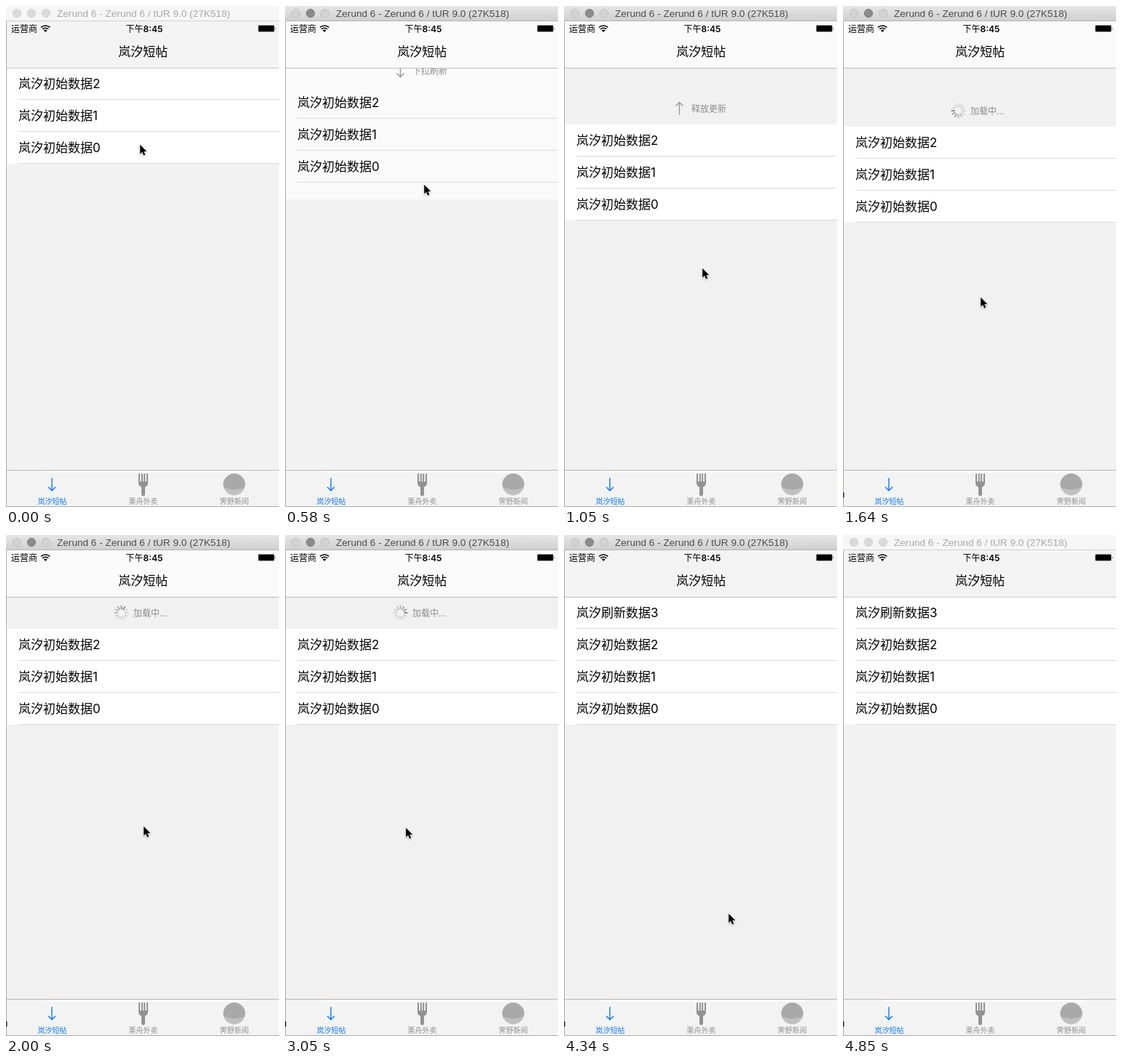
An HTML page for the animation above (4.89 s loop, 375 by 689 pixels).

```html
<!DOCTYPE html>
<html lang="zh-CN">
<head>
<meta charset="utf-8">
<style>
html, body { margin: 0; width: 100%; height: 100%; overflow: hidden; background: #f2f2f2; }
svg { display: block; width: 375px; height: 689px; }
text { font-family: Inter, "Noto Sans CJK SC", "Noto Sans CJK", sans-serif; }
#caption { font-family: "Liberation Sans", sans-serif; font-size: 13.6px; }
.mid { text-anchor: middle; }
.row { font-size: 17px; }
.tab { font-size: 10px; fill: #929292; text-anchor: middle; }
.line { fill: none; stroke-width: 1.4; }
</style>
</head>
<body>
<svg viewBox="0 0 375 689">
  <defs>
    <linearGradient id="chrome" x2="0" y2="1">
      <stop stop-color="#e6e6e6"/><stop offset="1" stop-color="#d0d0d0"/>
    </linearGradient>
    <clipPath id="page"><rect y="86" width="375" height="552"/></clipPath>
    <path id="arrow" d="M0-9V8.5M-5 3.5L0 8.5L5 3.5"/>
  </defs>

  <rect id="back" width="375" height="689"/>
  <g clip-path="url(#page)">
    <g id="header">
      <use id="pull" href="#arrow" class="line" stroke="#999"/>
      <g id="spinner"></g>
      <text id="hint" x="175" y="67.5" font-size="12" fill="#8c8c8c"></text>
    </g>
    <rect id="band" y="86" width="375" fill="#fafafa"/>
    <use id="pullOver" href="#arrow" class="line" stroke="#999"/>
    <text id="hintOver" x="175" font-size="12" fill="#8c8c8c">下拉刷新</text>
    <g id="list"><rect id="sheet" y="85" width="375" fill="#fff"/></g>
  </g>

  <rect id="nav" y="21" width="375" height="64"/>
  <rect id="navLine" y="85" width="375" height="1" fill="#bcbcbc"/>
  <rect id="sheen" x="248" y="22" width="82" height="1.5" fill="#fff"/>
  <text x="7" y="35.5" font-size="12">运营商</text>
  <path d="M48 29.4Q54.2 24.6 60.4 29.4M50.2 31.8Q54.2 28.6 58.2 31.8" fill="none" stroke="#000" stroke-width="1.6"/>
  <path d="M51.9 33.4Q54.2 31.8 56.5 33.4L54.2 36Z"/>
  <text class="mid" x="190" y="35.5" font-size="12" font-weight="600"><tspan font-weight="500">下午</tspan>8:45</text>
  <rect x="346.5" y="26.5" width="22" height="9" rx="1.5" stroke="#999"/>
  <path d="M369.7 29.3q1.5 1.7 0 3.4Z"/>
  <text class="mid" x="188.3" y="69" font-size="17" font-weight="500">岚汐短帖</text>

  <rect id="bar" width="375" height="20"/>
  <rect id="barLine" y="20" width="375" height="1"/>
  <g id="dots" stroke-width=".8">
    <circle cx="15" cy="10" r="5.7"/><circle cx="35" cy="10" r="5.7"/><circle cx="55" cy="10" r="5.7"/>
  </g>
  <text id="caption" x="70" y="15">Zerund 6 - Zerund 6 / tUR 9.0 (27K518)</text>

  <rect y="638" width="375" height="51" fill="#f3f3f3"/>
  <rect y="638" width="375" height="1" fill="#bababa"/>
  <rect x="56" y="640" width="275" height="1.5" fill="#fff"/>
  <use href="#arrow" class="line" stroke="#0a7aff" x="63" y="658"/>
  <text class="tab" x="63.5" y="684.8" style="fill:#0a7aff">岚汐短帖</text>
  <path fill="#929292" d="M182 643h2v11h1.8v-11h2v11h1.4v-11h2v11h1.8v-11h2v13q0 4-4 5.5v9.5q0 3-2.5 3t-2.5-3v-9.5q-4-1.5-4-5.5Z"/>
  <text class="tab" x="188.5" y="684.8">栗舟外卖</text>
  <circle cx="313.5" cy="658" r="15" fill="#c0c0c0"/>
  <path fill="#a9a9a9" d="M299.1 662.3A15 15 0 1 1 327.9 662.3Q313.5 668 299.1 662.3Z"/>
  <text class="tab" x="313.5" y="684.8">霁野新闻</text>

  <path d="M.5 21V688.5H375" fill="none" stroke="#a8a8a8"/>
  <rect id="speck" y="669" width="1.5" height="7" fill="#1c1c50"/>
  <path id="cursor" d="M0 0V14.5L3.3 11.4L5.6 16.7L8 15.7L5.8 10.5H10.3Z"
    stroke="#fff" stroke-width="1.2" paint-order="stroke" style="filter:drop-shadow(0 1px 1px #0005)"/>
</svg>
<script>
const LOOP = 4890, TICK = 117.1;
const $ = id => document.getElementById(id);
const set = (el, attrs) => { for (const k in attrs) el.setAttribute(k, attrs[k]); };
const show = (el, on) => set(el, { visibility: on ? 'visible' : 'hidden' });

function add(parent, tag, attrs) {
  const el = document.createElementNS('http://www.w3.org/2000/svg', tag);
  set(el, attrs);
  return parent.appendChild(el);
}

// Keys are [tick, value, ...]; values between keys are linear.
const pullKeys = [[2, 0], [3, 5], [4, 14], [5, 26], [6, 43], [7, 57], [8, 69], [9, 78], [10, 92], [11, 96],
  [13, 96], [14, 81], [15, 58], [16, 46], [17, 44], [29, 44], [30, 30], [31, 9], [32, 1], [34, 1], [35, 0]];
const cursorKeys = [[0, 183, 190], [2, 185, 191], [3, 187, 201], [4, 189, 220], [5, 190, 245], [6, 190, 280],
  [8, 189, 339], [9, 189, 360], [10, 188, 392], [11, 188, 400], [23, 188, 400], [25, 170, 402], [26, 165, 402],
  [28, 170, 402], [29, 177, 407], [31, 190, 421], [32, 192, 424], [33, 193, 426], [34, 193, 426],
  [35, 190, 428], [36, 194, 442], [37, 225, 520], [38, 275, 620], [39, 306, 676]];

function track(keys, n) {
  const i = keys.findIndex(k => k[0] > n);
  if (i === 0) return keys[0].slice(1);
  if (i < 0) return keys[keys.length - 1].slice(1);
  const a = keys[i - 1], b = keys[i], p = (n - a[0]) / (b[0] - a[0]);
  return a.slice(1).map((v, j) => v + (b[j + 1] - v) * p);
}

const rows = [0, 1, 2, 3].map(i => {
  const label = add($('list'), 'text', { class: 'row', x: 17, y: 113 + i * 44 });
  const rule = add($('list'), 'rect', { x: 17, y: 128 + i * 44, width: 358, height: 1, fill: '#d9d9d9' });
  return { label, rule };
});

const spokes = Array.from({ length: 12 }, (_, i) => add($('spinner'), 'path', {
  d: 'M0-5.5V-9.2', stroke: '#858585', 'stroke-width': 1.9, 'stroke-linecap': 'round',
  transform: `translate(158.5 63) rotate(${i * 30})`
}));

function draw(t) {
  const n = Math.floor((t + 13) / TICK);
  const ended = t >= 4850;
  const active = n >= 1 && !ended;
  const loading = n >= 14, fresh = n >= 29;
  const pull = Math.round(track(pullKeys, n)[0]);
  const [cx, cy] = track(cursorKeys, n).map(Math.round);

  set($('bar'), { fill: active ? 'url(#chrome)' : '#f6f6f6' });
  set($('barLine'), { fill: active ? '#b4b4b4' : '#d2d2d2' });
  set($('caption'), { fill: active ? '#4c4c4c' : '#a9a9a9' });
  [...$('dots').children].forEach((dot, i) => set(dot, active && i === 1
    ? { fill: '#8b8b8b', stroke: '#777' }
    : { fill: active ? '#d3d3d3' : '#dadada', stroke: active ? '#bcbcbc' : '#cecece' }));
  set($('nav'), { fill: active && n < 31 ? '#fafafa' : '#f3f3f3' });
  set($('navLine'), { fill: active ? '#bcbcbc' : '#cccccc' });
  set($('back'), { fill: n >= 6 && !ended ? '#f1f1f1' : '#f2f2f2' });
  show($('sheen'), fresh);
  show($('speck'), loading);

  const washed = n >= 3 && n <= 5;
  show($('band'), washed);
  set($('band'), { height: cy - 65 });
  show($('pullOver'), washed);
  show($('hintOver'), washed);
  set($('pullOver'), { transform: `translate(158.5 ${63 + pull})` });
  set($('hintOver'), { y: 67.5 + pull });

  const turn = pull <= 44 ? 0 : n === 7 ? 120 : 180;
  set($('header'), { transform: `translate(0 ${pull})` });
  show($('pull'), !loading && !washed);
  set($('pull'), { transform: `translate(158.5 63) rotate(${turn})` });
  show($('spinner'), loading);
  $('hint').textContent = loading ? '加载中...' : turn ? '释放更新' : '下拉刷新';
  const head = Math.floor((270 + (n - 14) * 45) / 30);
  spokes.forEach((s, i) => {
    const age = ((head - i) % 12 + 12) % 12;
    set(s, { opacity: Math.max(0.27, 0.95 - age * 0.12) });
  });

  const count = fresh ? 4 : 3;
  set($('list'), { transform: `translate(0 ${pull})` });
  set($('sheet'), { height: count * 44, fill: washed ? '#fafafa' : '#fff' });
  rows.forEach(({ label, rule }, i) => {
    show(label, i < count);
    show(rule, i < count);
    const id = count - 1 - i;
    label.textContent = `岚汐${id === 3 ? '刷新' : '初始'}数据${id}`;
  });

  show($('cursor'), !ended);
  set($('cursor'), { transform: `translate(${cx + 1.2} ${cy + 0.8}) scale(.88)` });
}

const start = performance.now();
function frame() {
  draw((performance.now() - start) % LOOP);
  requestAnimationFrame(frame);
}
frame();
</script>
</body>
</html>
```
